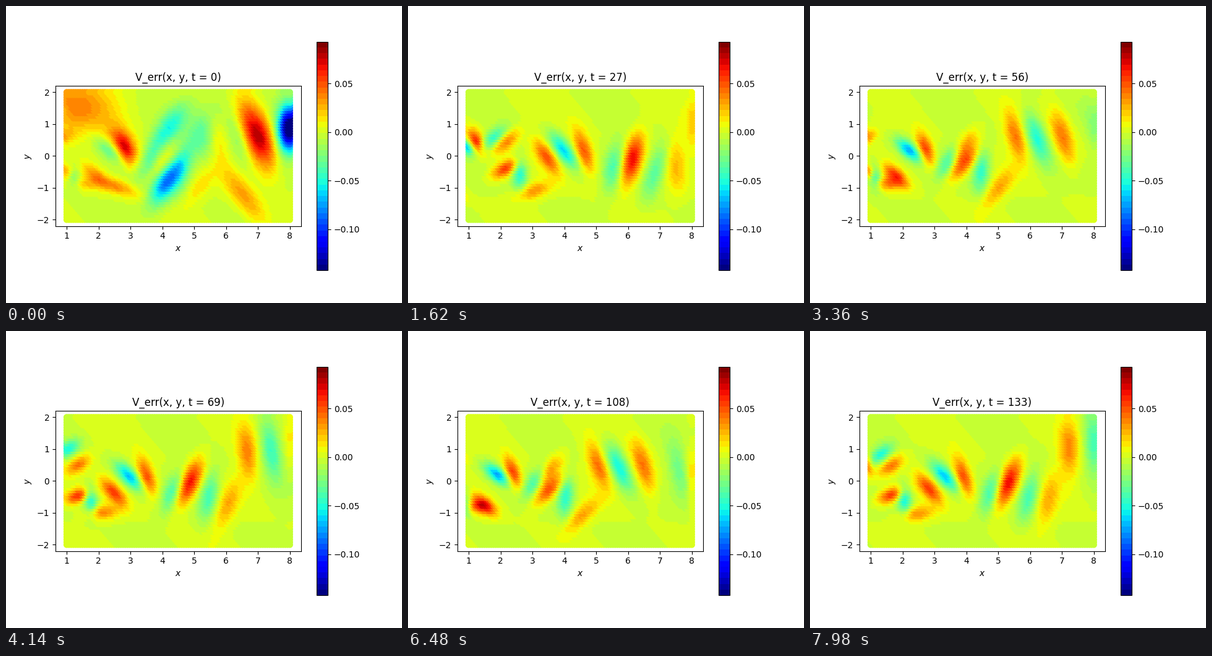
A matplotlib script that plays this animation: 640 px wide and 480 px high, repeating every 8 s.

```python
import numpy as np
import matplotlib.pyplot as plt
from matplotlib.animation import FuncAnimation

FRAMES = 134
LOOP_MS = 8000
PERIOD = 58                 # steps between two shed vortices of a lane
VMIN, VMAX = -0.1424, 0.0933

# Downstream speed grows linearly: c(x) = C0 + C1 * x
C0, C1 = 0.035, 0.0083

# Lanes of the wake: step of shedding, height at the inlet,
# y at inlet, y at outlet, bend between them, tilt at inlet, tilt at outlet
LANES = [
    (21, 0.068, 0.55, 0.9, -0.55, -70, -75),
    (38, 0.060, -0.9, 1.2, 0.2, -35, -95),
    (2, 0.062, -0.45, -0.1, 0.1, 15, 100),
    (2, 0.044, 0.6, -0.3, 0.1, 30, 90),
    (45, 0.040, -0.7, 0.0, -0.7, -15, 100),
    (30, -0.075, 0.35, 1.2, -0.5, -30, -85),
    (9, -0.050, 1.1, 0.5, -1.1, 35, 105),
    (52, -0.060, -0.6, -0.5, 0.15, 95, 70),
]

# Errors of the start, which drift away and die out:
# centre x, centre y, long radius, short radius, tilt, height
STARTUP = [
    (1.3, 1.6, 0.95, 0.6, 0, 0.036),
    (2.85, 0.4, 0.45, 0.25, -55, 0.05),
    (2.6, -0.9, 0.5, 0.16, -20, 0.035),
    (4.2, -0.7, 0.6, 0.25, 60, -0.085),
    (4.2, 0.8, 0.7, 0.25, 58, -0.055),
    (5.3, 0.8, 0.7, 0.35, 70, -0.035),
    (6.6, -1.2, 0.75, 0.25, -55, 0.032),
    (6.95, 0.7, 0.8, 0.3, -72, 0.072),
    (8.0, 0.9, 0.5, 0.23, 90, -0.15),
]


def carry(x, dt):
    """Position dt steps later of a particle now at x."""
    return (x + C0 / C1) * np.exp(C1 * dt) - C0 / C1


def blob(x, y, cx, cy, a, b, deg, height):
    c, s = np.cos(np.radians(deg)), np.sin(np.radians(deg))
    dx, dy = x - cx, y - cy
    u, v = (dx * c + dy * s) / a, (dy * c - dx * s) / b
    return height * np.exp(-(u * u + v * v) / 2)


def street(t, x, y):
    """Vortices that grow, tilt and fade on their way downstream."""
    total = np.zeros_like(x)
    for birth, height, y0, y1, bend, tilt0, tilt1 in LANES:
        for lap in range(-1, 3):
            cx = carry(1, (t - birth) % PERIOD + lap * PERIOD)
            s = (cx - 1) / 7
            cy = y0 + (y1 - y0) * s + bend * np.sin(np.pi * s)
            total += blob(x, y, cx, cy, 0.28 + 0.4 * s, 0.15 + 0.07 * s,
                          tilt0 + (tilt1 - tilt0) * s, height * (1 - 0.45 * s))
    return total


def field(t, x, y):
    fade = np.exp(-t / 7)
    startup = sum(blob(x, y, carry(cx, t), *rest) for cx, *rest in STARTUP)
    ripple = np.sin(1.6 * (x - 0.07 * t) + 1.3 * y) * np.cos(1.7 * y + 0.5)
    return ((1 - 0.5 * fade) * street(t, x, y) + fade * startup
            + 0.005 * ripple - 0.001)


gx, gy = (g.ravel() for g in np.meshgrid(np.linspace(1, 8, 100),
                                         np.linspace(-2, 2, 50)))

fig, ax = plt.subplots(figsize=(6.4, 4.8), dpi=100)
dots = ax.scatter(gx, gy, c=field(0, gx, gy), s=56, linewidths=0,
                  cmap=plt.get_cmap("jet", 40), vmin=VMIN, vmax=VMAX)
ax.set_aspect("equal")
ax.set_xlim(0.65, 8.35)
ax.set_ylim(-2.2, 2.2)
ax.set_xticks(range(1, 9))
ax.set_yticks(range(-2, 3))
ax.set_xlabel("$x$")
ax.set_ylabel("$y$")
title = ax.set_title("V_err(x, y, t = 0)")
fig.colorbar(dots, ax=ax)


def update(t):
    dots.set_array(field(t, gx, gy))
    title.set_text(f"V_err(x, y, t = {t})")
    return dots, title


anim = FuncAnimation(fig, update, frames=FRAMES, interval=LOOP_MS / FRAMES,
                     repeat=True, repeat_delay=0, blit=False)
plt.show()
```
